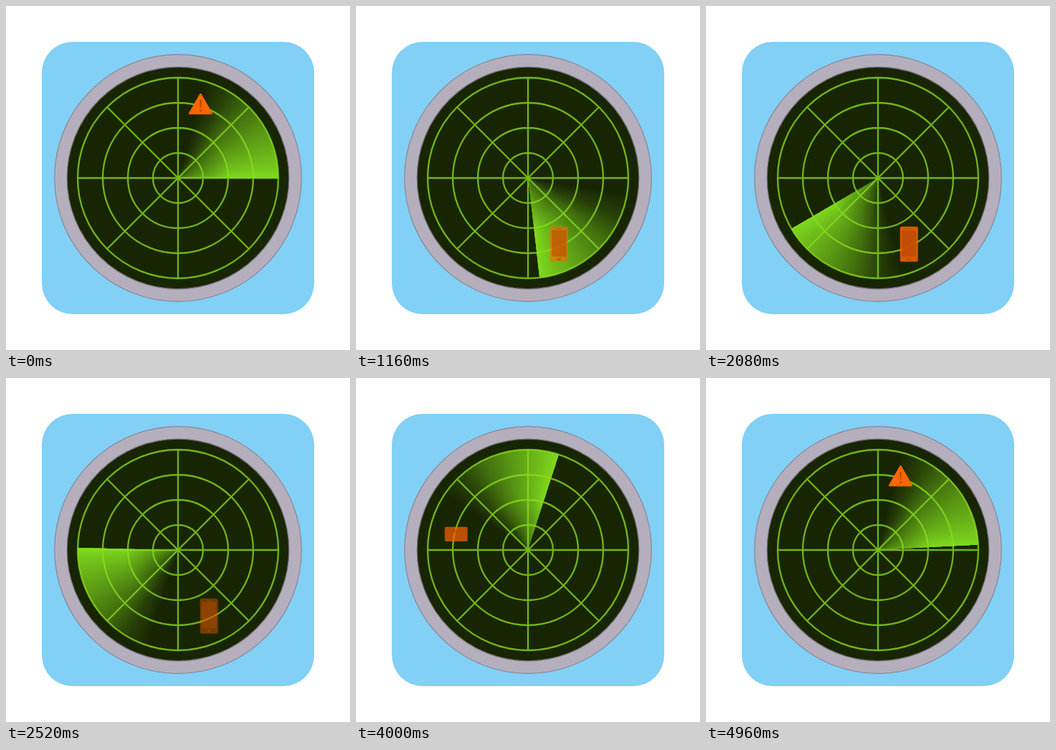
These frames come from a looping animation (480 by 480 pixels, 5000 ms). An HTML page with a canvas:

```html
<!DOCTYPE html>
<html lang="en">
<head>
<meta charset="utf-8">
<title>Radar</title>
<style>
  html, body { margin: 0; width: 100%; height: 100%; overflow: hidden; background: #fff; }
  canvas { display: block; width: 480px; height: 480px; }
</style>
</head>
<body>
<canvas id="stage"></canvas>
<script>
const LOOP = 5000, STEP = 40, C = 240, R = 140;
const ORANGE = '#ff6600', BROWN = '#bf4a02';

// degrees behind the beam, opacity
const TRAIL = [[0, .92], [10, .79], [30, .57], [45, .38], [60, .14], [74, 0]];

const canvas = document.getElementById('stage');
const ctx = canvas.getContext('2d');
const ratio = window.devicePixelRatio || 1;
canvas.width = canvas.height = 480 * ratio;

function disc(x, y, r, fill, stroke) {
  ctx.beginPath();
  ctx.arc(x, y, r, 0, Math.PI * 2);
  if (fill) { ctx.fillStyle = fill; ctx.fill(); }
  if (stroke) { ctx.strokeStyle = stroke; ctx.stroke(); }
}

function box(x, y, w, h, r, fill) {
  ctx.beginPath();
  ctx.roundRect(x, y, w, h, r);
  ctx.fillStyle = fill;
  ctx.fill();
}

function poly(points, fill) {
  ctx.beginPath();
  points.forEach(([x, y]) => ctx.lineTo(x, y));
  ctx.closePath();
  ctx.fillStyle = fill;
  ctx.fill();
}

function warning() {
  poly([[271.5, 123], [287, 150], [256, 150]], ORANGE);
  ctx.strokeStyle = ORANGE;
  ctx.lineWidth = 2.4;
  ctx.lineJoin = 'round';
  ctx.stroke();
  poly([[269.9, 131], [273.1, 131], [272.3, 142.3], [270.7, 142.3]], BROWN);
  disc(271.5, 146, 1.7, BROWN);
}

function phone() {
  box(270.8, 307.8, 25, 49, 2.5, ORANGE);
  box(273.2, 313, 20.4, 36.6, .5, BROWN);
  box(279.6, 310, 7.4, 1.5, .7, BROWN);
  box(280.4, 351.6, 5.4, 3.4, 1.5, BROWN);
}

function card() {
  box(123.8, 207.8, 31.8, 20.2, 1.4, ORANGE);
  box(123.8, 211.4, 31.8, 4.4, 0, BROWN);
  box(126.8, 221.4, 6.8, 3.4, 1.2, BROWN);
}

const BLIPS = [
  { draw: warning, start: 3990 },
  { draw: phone, start: 900 },
  { draw: card, start: 2690 }
];

function blipAlpha(age) {
  if (age < 450) return age / 450;
  return Math.max(0, Math.min(1, 2 - age / 1000));
}

function drawCase() {
  ctx.fillStyle = '#fff';
  ctx.fillRect(0, 0, 480, 480);
  box(50, 50, 380, 380, 43, '#82d0f5');
  ctx.lineWidth = 1.2;
  disc(C, C, 172.3, '#b5aebd', '#8b8496');
  disc(C, C, 154.8, '#182503', '#6f6b70');
}

function drawBeam(angle) {
  const fan = ctx.createConicGradient(angle, C, C);
  fan.addColorStop(0, 'rgba(135,232,32,0)');
  for (const [deg, a] of TRAIL) {
    fan.addColorStop(1 - deg / 360, `rgba(135,232,32,${a})`);
  }
  const from = angle - 80 * Math.PI / 180;
  const sector = fill => {
    ctx.beginPath();
    ctx.moveTo(C, C);
    ctx.arc(C, C, R, from, angle);
    ctx.closePath();
    ctx.fillStyle = fill;
    ctx.fill();
  };
  sector(fan);
  // the glow weakens towards the hub
  const hub = ctx.createRadialGradient(C, C, 0, C, C, 75);
  hub.addColorStop(0, 'rgba(24,37,3,.5)');
  hub.addColorStop(1, 'rgba(24,37,3,0)');
  sector(hub);
}

function drawGrid() {
  const line = 'rgba(140,222,30,.78)';
  ctx.lineWidth = 2.3;
  ctx.beginPath();
  for (let r = 35; r <= R; r += 35) {
    ctx.moveTo(C + r, C);
    ctx.arc(C, C, r, 0, Math.PI * 2);
  }
  for (let i = 0; i < 4; i++) {
    const x = R * Math.cos(i * Math.PI / 4), y = R * Math.sin(i * Math.PI / 4);
    ctx.moveTo(C - x, C - y);
    ctx.lineTo(C + x, C + y);
  }
  ctx.strokeStyle = line;
  ctx.stroke();
}

function render(t) {
  ctx.setTransform(ratio, 0, 0, ratio, 0, 0);
  drawCase();
  drawBeam(t / LOOP * Math.PI * 2);
  drawGrid();
  for (const { draw, start } of BLIPS) {
    ctx.globalAlpha = blipAlpha((t - start + LOOP) % LOOP);
    if (ctx.globalAlpha > 0) draw();
  }
  ctx.globalAlpha = 1;
}

const begin = performance.now();
function tick() {
  const t = (performance.now() - begin) % LOOP;
  render(Math.floor(t / STEP) * STEP);
  requestAnimationFrame(tick);
}
tick();
</script>
</body>
</html>
```
